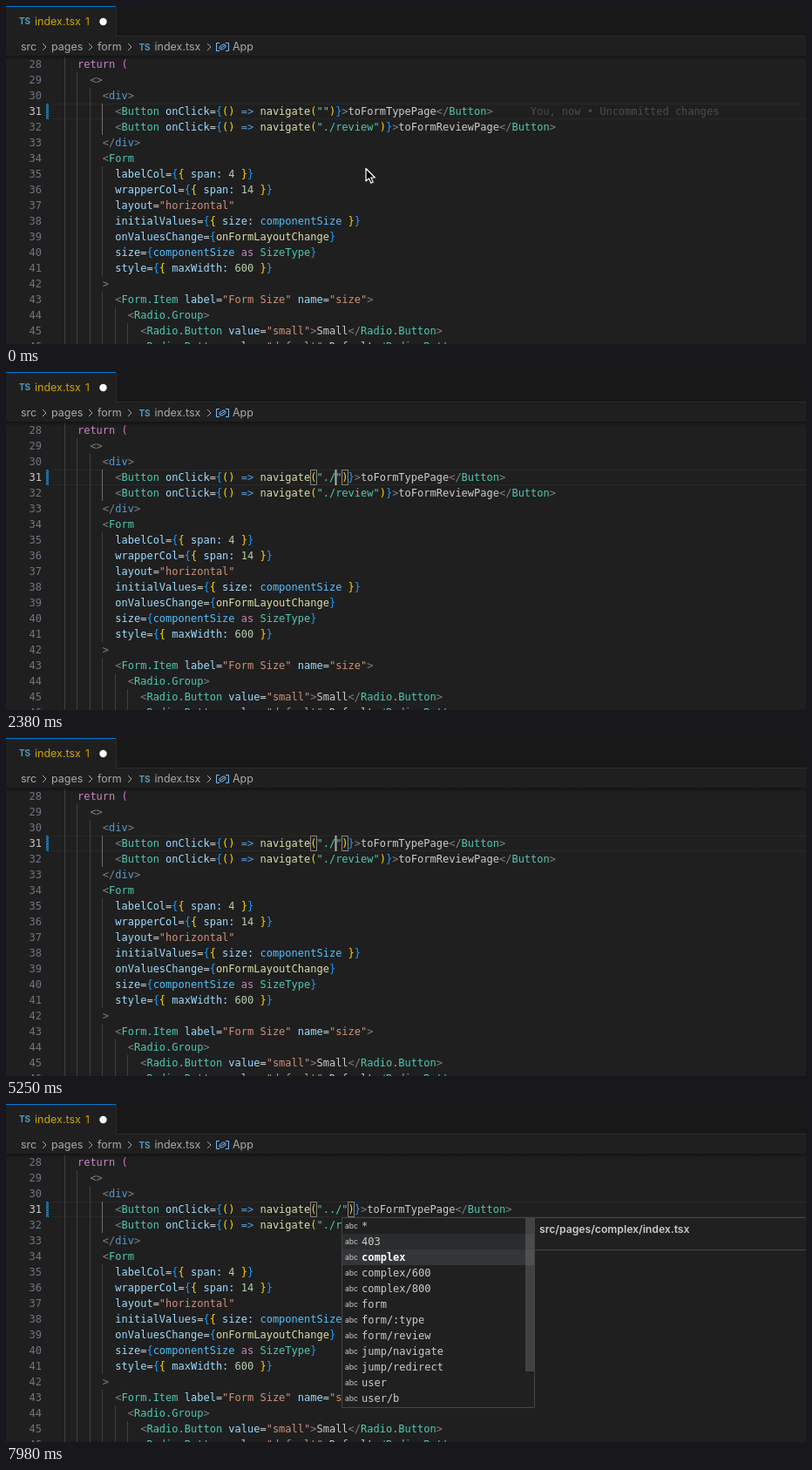
Animation, 918 px wide and 388 px high, one loop 8 s. Source, as an HTML page with a canvas:

```html
<!DOCTYPE html>
<html lang="en">
<head>
<meta charset="utf-8">
<title>Route completion</title>
<style>
  html, body { margin: 0; width: 100%; height: 100%; overflow: hidden; background: #1f1f1f; }
  canvas { display: block; width: 918px; height: 388px; }
</style>
</head>
<body>
<canvas id="stage"></canvas>
<script>
const W = 918, H = 388, LOOP = 8000;
const CHAR = 7.224, LEFT = 67.5, ROW = 18, TOP = 58, FIRST = 28;
const MONO = '12px "DejaVu Sans Mono", monospace';
const UI = '12.5px Inter, sans-serif';
const canvas = document.getElementById('stage');
const ctx = canvas.getContext('2d');
const dpr = window.devicePixelRatio || 1;
canvas.width = W * dpr;
canvas.height = H * dpr;
ctx.scale(dpr, dpr);

const COLORS = {
  g: '#808080', t: '#4ec9b0', d: '#569cd6', a: '#9cdcfe', w: '#cccccc', s: '#ce9178',
  r: '#4ec9b0', f: '#dcdcaa', k: '#c586c0', c: '#4fc1ff', n: '#b5cea8',
  1: '#da70d6', 2: '#179fff', 3: '#ffd700'
};

// Each piece starts with its colour key; pieces are split by "|".
const button = (path, label) =>
  `g<|tButton|a onClick|w=|2{|3()|d => |fnavigate|3(|r"${path}"|3)|2}|g>|w${label}|g</|tButton|g>`;
const radio = (value, label) =>
  `g<|tRadio.Button|a value|w=|s"${value}"|g>|w${label}|g</|tRadio.Button|g>`;
const objectProp = (name, key, kind, value) =>
  `a${name}|w=|2{|3{|a ${key}: |${kind}${value} |3}|2}`;

// [indent column, markup]
const codeLines = path => [
  [2, 'kreturn |1('],
  [4, 'g<>'],
  [6, 'g<|ddiv|g>'],
  [8, button(path, 'toFormTypePage')],
  [8, button('./review', 'toFormReviewPage')],
  [6, 'g</|ddiv|g>'],
  [6, 'g<|tForm'],
  [8, objectProp('labelCol', 'span', 'n', '4')],
  [8, objectProp('wrapperCol', 'span', 'n', '14')],
  [8, 'alayout|w=|s"horizontal"'],
  [8, objectProp('initialValues', 'size', 'c', 'componentSize')],
  [8, 'aonValuesChange|w=|2{|fonFormLayoutChange|2}'],
  [8, 'asize|w=|2{|ccomponentSize|k as |tSizeType|2}'],
  [8, objectProp('style', 'maxWidth', 'n', '600')],
  [6, 'g>'],
  [8, 'g<|tForm.Item|a label|w=|s"Form Size"|a name|w=|s"size"|g>'],
  [10, 'g<|tRadio.Group|g>'],
  [12, radio('small', 'Small')],
  [12, radio('default', 'Default')]
];

const ACTIVE = 3;                       // row being edited
const ACTIVE_Y = TOP + ACTIVE * ROW;
const PAREN = 8 + 31;                   // column of the call's "("

const CLICK = 910, HIDE_MOUSE = 1810, BLINK = 480;
const edits = [[0, ''], [1810, '.'], [2360, './'], [6580, '.'], [6790, '..'], [7060, '../']];
const formRoutes = [':type', 'review'];
const allRoutes = ['*', '403', 'complex', 'complex/600', 'complex/800', 'form', 'form/:type',
  'form/review', 'jump/navigate', 'jump/redirect', 'user', 'user/b'];
// [from, to, routes, selected index, file]
const popups = [
  [2440, 3430, formRoutes, 0, 'src/pages/form/$type.tsx'],
  [3430, 3850, formRoutes, 1, 'src/pages/form/review.tsx'],
  [7200, 7550, allRoutes, 0, 'src/pages/$.tsx'],
  [7550, 7970, allRoutes, 1, 'src/pages/403.tsx'],
  [7970, LOOP, allRoutes, 2, 'src/pages/complex/index.tsx']
];

const colX = col => LEFT + col * CHAR;

function rect(x, y, w, h, color) {
  ctx.fillStyle = color;
  ctx.fillRect(x, y, w, h);
}

function frame(x, y, w, h, color) {
  ctx.strokeStyle = color;
  ctx.lineWidth = 1;
  ctx.strokeRect(x + 0.5, y + 0.5, w - 1, h - 1);
}

function line(points, color, width = 1) {
  ctx.strokeStyle = color;
  ctx.lineWidth = width;
  ctx.beginPath();
  points.forEach(([x, y]) => ctx.lineTo(x, y));
  ctx.stroke();
}

function label(text, x, y, color, font = UI) {
  ctx.font = font;
  ctx.fillStyle = color;
  ctx.fillText(text, x, y);
}

function mono(text, x, y, color, font = MONO) {
  ctx.font = font;
  ctx.fillStyle = color;
  [...text].forEach((ch, i) => { if (ch !== ' ') ctx.fillText(ch, x + i * CHAR, y); });
}

function markup(text, col, y) {
  for (const piece of text.split('|')) {
    mono(piece.slice(1), colX(col), y, COLORS[piece[0]]);
    col += piece.length - 1;
  }
  return col;
}

function chevron(x, y, color) {
  line([[x - 2, y - 4], [x + 2, y], [x - 2, y + 4]], color);
}

function drawHeader() {
  rect(0, 0, W, 35, '#181818');
  rect(0, 34, W, 1, '#2b2b2b');
  rect(0, 0, 126, 35, '#1f1f1f');
  rect(0, 0, 126, 1, '#0078d4');
  rect(126, 0, 1, 35, '#2b2b2b');
  const badge = 'bold 10px Inter, sans-serif';
  label('TS', 15, 21, '#519aba', badge);
  label('index.tsx', 33, 22, '#cca700');
  label('1', 91, 22, '#cca700', '12px Inter, sans-serif');
  ctx.fillStyle = '#ffffff';
  ctx.beginPath();
  ctx.arc(111.5, 18, 4.2, 0, Math.PI * 2);
  ctx.fill();

  const gray = '#a9a9a9';
  [['src', 17], ['pages', 52], ['form', 105], ['index.tsx', 170.5], ['App', 260]]
    .forEach(([text, x]) => label(text, x, 51, gray));
  [44, 97, 142, 233].forEach(x => chevron(x, 47, gray));
  label('TS', 152.5, 50.5, '#519aba', badge);
  const blue = '#75beff';
  line([[245, 42.5], [241.5, 42.5], [241.5, 51.5], [245, 51.5]], blue);
  line([[252, 42.5], [255.5, 42.5], [255.5, 51.5], [252, 51.5]], blue);
  ctx.beginPath();
  ctx.ellipse(248.5, 47, 4, 2.4, -0.5, 0, Math.PI * 2);
  ctx.stroke();
  line([[246, 48.5], [251, 45.5]], blue);
}

function drawGutterMark() {
  ctx.save();
  ctx.beginPath();
  ctx.rect(46, ACTIVE_Y, 3, ROW);
  ctx.clip();
  for (let y = -2; y < ROW + 4; y += 3) {
    line([[45, ACTIVE_Y + y + 2], [50, ACTIVE_Y + y - 3]], '#2090d3', 1.3);
  }
  ctx.restore();
}

function drawCode(path, t) {
  rect(53, ACTIVE_Y, W - 53, 1, '#282828');
  rect(53, ACTIVE_Y + ROW - 1, W - 53, 1, '#282828');
  codeLines(path).forEach(([indent, text], i) => {
    const y = TOP + i * ROW;
    for (let col = 0; col < indent; col += 2) {
      const lit = col === 6 && (i === ACTIVE || i === ACTIVE + 1);
      rect(Math.floor(colX(col)), y, 1, ROW, lit ? '#707070' : '#404040');
    }
    mono(String(FIRST + i), 26.5, y + 13, i === ACTIVE ? '#cccccc' : '#6e7681');
    const end = markup(text, indent, y + 13);
    if (i === ACTIVE && path === '') {
      mono('You, now • Uncommitted changes', colX(end) + 43, y + 13, '#4c4c4c');
    }
  });
  drawGutterMark();
  if (t >= CLICK) {
    [PAREN, PAREN + path.length + 3].forEach(col =>
      frame(Math.floor(colX(col)), ACTIVE_Y, 8, ROW, '#888888'));
  }
  const shade = ctx.createLinearGradient(0, 57, 0, 62);
  shade.addColorStop(0, 'rgba(0,0,0,.4)');
  shade.addColorStop(1, 'rgba(0,0,0,0)');
  rect(0, 57, W, 5, shade);
}

function drawCaret(path, t) {
  if (t < CLICK) return;
  const last = edits.reduce((at, [time]) => time > CLICK && time <= t ? time : at, CLICK);
  if (Math.floor((t - last) / BLINK) % 2 === 0) {
    rect(Math.floor(colX(PAREN + 2 + path.length)) - 0.5, ACTIVE_Y, 2, ROW, '#aeafad');
  }
}

function drawPopup(path, [, , routes, selected, file]) {
  const x = Math.floor(colX(PAREN + 2 + path.length));
  const y = ACTIVE_Y + ROW, w = 222, h = routes.length * ROW + 3;
  const bg = '#202020', border = '#454545';
  const hovered = 1;                    // the resting pointer lies over this row
  rect(x, y, w, h, bg);
  routes.forEach((route, i) => {
    const top = y + 1 + i * ROW, on = i === selected;
    if (on || i === hovered) rect(x + 1, top, w - 2, ROW, on ? '#343538' : '#2a2d2e');
    label('abc', x + 4, top + 12, '#cccccc', '8.5px Inter, sans-serif');
    mono(route, x + 23, top + 13, on ? '#ffffff' : '#cccccc', on ? 'bold ' + MONO : MONO);
    if (on && i === hovered && routes === formRoutes) chevron(x + 202, top + 9, '#cccccc');
  });
  if (routes === allRoutes) rect(x + w - 11, y + 1, 10, 176, 'rgba(121,121,121,.4)');
  frame(x, y, w, h, border);

  const dx = x + w - 1;
  rect(dx, y, 331, 38, bg);
  frame(dx, y, 331, 38, border);
  label(file, dx + 6, y + 18, '#cccccc', '600 12.2px Inter, sans-serif');
  const cx = dx + 319.5, cy = y + 14;
  line([[cx - 4, cy - 4], [cx + 4, cy + 4]], '#cccccc');
  line([[cx - 4, cy + 4], [cx + 4, cy - 4]], '#cccccc');
}

function drawArrow(x, y) {
  const shape = [[0, 0], [0, 14.5], [3.4, 11.4], [5.8, 16.8], [8.2, 15.7], [5.9, 10.5], [10.4, 10.5]];
  ctx.beginPath();
  shape.forEach(([dx, dy]) => ctx.lineTo(x + dx, y + dy));
  ctx.closePath();
  ctx.fillStyle = '#000000';
  ctx.fill();
  ctx.strokeStyle = '#ffffff';
  ctx.lineWidth = 1.2;
  ctx.lineJoin = 'round';
  ctx.stroke();
}

function drawBeam(x, y) {
  for (const [color, width] of [['#000000', 3.2], ['#ffffff', 1.5]]) {
    line([[x - 3.5, y - 7], [x - 1, y - 6.5], [x, y - 5], [x + 1, y - 6.5], [x + 3.5, y - 7]], color, width);
    line([[x - 3.5, y + 7], [x - 1, y + 6.5], [x, y + 5], [x + 1, y + 6.5], [x + 3.5, y + 7]], color, width);
    line([[x, y - 5.5], [x, y + 5.5]], color, width);
    line([[x - 2, y + 2], [x + 2, y + 2]], color, width);
  }
}

function ease(t, from, to) {
  const p = Math.min(1, Math.max(0, (t - from) / (to - from)));
  return p * p * (3 - 2 * p);
}

function drawMouse(t) {
  if (t < 70) return drawArrow(413, 186.5);
  if (t >= HIDE_MOUSE) return;
  const up = ease(t, 0, 800), down = ease(t, 900, 1060);
  drawBeam(413 - 48 * up + 21.5 * down, 187 - 66 * up + 40 * down);
}

function draw(t) {
  const path = edits.filter(([time]) => time <= t).pop()[1];
  rect(0, 0, W, H, '#1f1f1f');
  drawHeader();
  drawCode(path, t);
  drawCaret(path, t);
  const popup = popups.find(([from, to]) => t >= from && t < to);
  if (popup) drawPopup(path, popup);
  drawMouse(t);
}

const start = performance.now();
function tick() {
  draw((performance.now() - start) % LOOP);
  requestAnimationFrame(tick);
}
tick();
</script>
</body>
</html>
```
